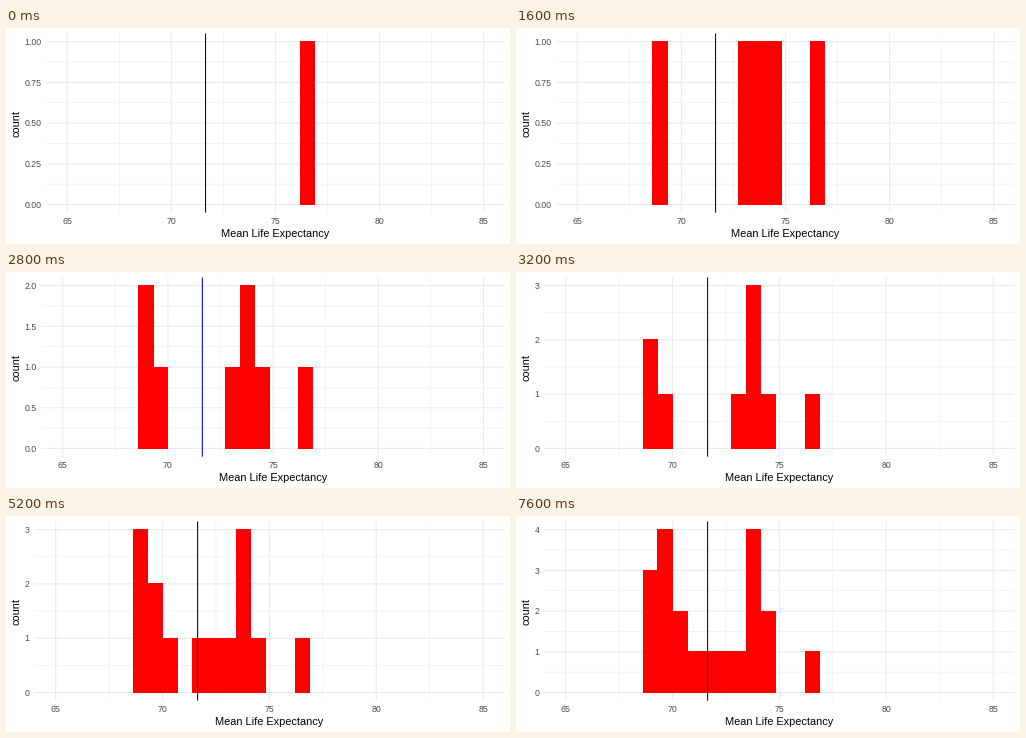
Recreate the animation shown at these times as a matplotlib script. Size 504 by 216 pixels, loop 8000 ms.

```python
import math

import matplotlib.pyplot as plt
from matplotlib.animation import FuncAnimation
from matplotlib.patches import Rectangle

WIDTH, HEIGHT, DPI = 504, 216, 72
TOP, BOTTOM, RIGHT = 5.5, 184.6, 498.5
X_MIN, X_MAX = 64, 86
BIN = 20 / 29
MEAN = 71.64
GRID = "#EBEBEB"

# Bin index (multiple of BIN) that receives each new sample mean
SAMPLES = [111, 106, 108, 107, 100, 100, 101, 107, 107, 105,
           101, 104, 100, 102, 108, 101, 107, 101, 102, 103]

# Highest count: (break step, decimals, panel left edge, mean line colour)
SCALES = {
    1: (0.25, 2, 40.5, "#05053C"),
    2: (0.5, 1, 35.6, "#0000FF"),
    3: (1, 0, 28.3, "#05053C"),
    4: (1, 0, 28.3, "#05053C"),
}

plt.rcParams["font.family"] = "Liberation Sans"
fig = plt.figure(figsize=(WIDTH / DPI, HEIGHT / DPI), dpi=DPI, facecolor="white")
ax = fig.add_axes([0, 0, 1, 1])


def draw(frame):
    ax.clear()
    ax.set_xlim(0, WIDTH)
    ax.set_ylim(HEIGHT, 0)
    ax.axis("off")

    seen = SAMPLES[:frame + 1]
    counts = {b: seen.count(b) for b in sorted(set(seen))}
    peak = max(counts.values())
    step, decimals, left, line_color = SCALES[peak]
    unit = (BOTTOM - TOP) / (1.1 * peak)

    def px(x):
        return left + (x - X_MIN) * (RIGHT - left) / (X_MAX - X_MIN)

    def py(y):
        return BOTTOM - (y + 0.05 * peak) * unit

    def line(xs, ys, color, width, z):
        ax.plot(xs, ys, color=color, lw=width, zorder=z,
                solid_capstyle="butt", snap=False)

    def label(x, y, text, size=8.8, color="#4D4D4D", ha="center", **kw):
        ax.text(x, y, text, fontsize=size, color=color, ha=ha,
                va="baseline", **kw)

    for i in range(9):
        major = i % 2 == 0
        x = 65 + 2.5 * i
        line([px(x)] * 2, [TOP, BOTTOM], GRID, 1.07 if major else 0.53, 1 + major)
        if major:
            label(px(x), 195.9, f"{x:.0f}")

    for i in range(2 * math.floor(peak / step) + 1):
        major = i % 2 == 0
        y = i * step / 2
        line([left, RIGHT], [py(y)] * 2, GRID, 1.07 if major else 0.53, 1 + major)
        if major:
            label(left - 4.95, py(y) + 3.2, f"{y:.{decimals}f}", ha="right")

    for b, n in counts.items():
        x0, x1 = px((b - 0.5) * BIN), px((b + 0.5) * BIN)
        ax.add_patch(Rectangle((x0, py(n)), x1 - x0, py(0) - py(n), fc="#FF0000",
                               lw=0, antialiased=False, snap=False, zorder=3))

    line([px(MEAN)] * 2, [TOP, BOTTOM], line_color, 1.07, 4)

    label((left + RIGHT) / 2, 208.7, "Mean Life Expectancy", 11, "black")
    ax.text(13.4, (TOP + BOTTOM) / 2, "count", fontsize=11, color="black",
            rotation=90, rotation_mode="anchor", ha="center", va="baseline")
    return []


anim = FuncAnimation(fig, draw, frames=len(SAMPLES), init_func=lambda: [],
                     interval=400, repeat=True, repeat_delay=0, blit=False)
plt.show()
```
